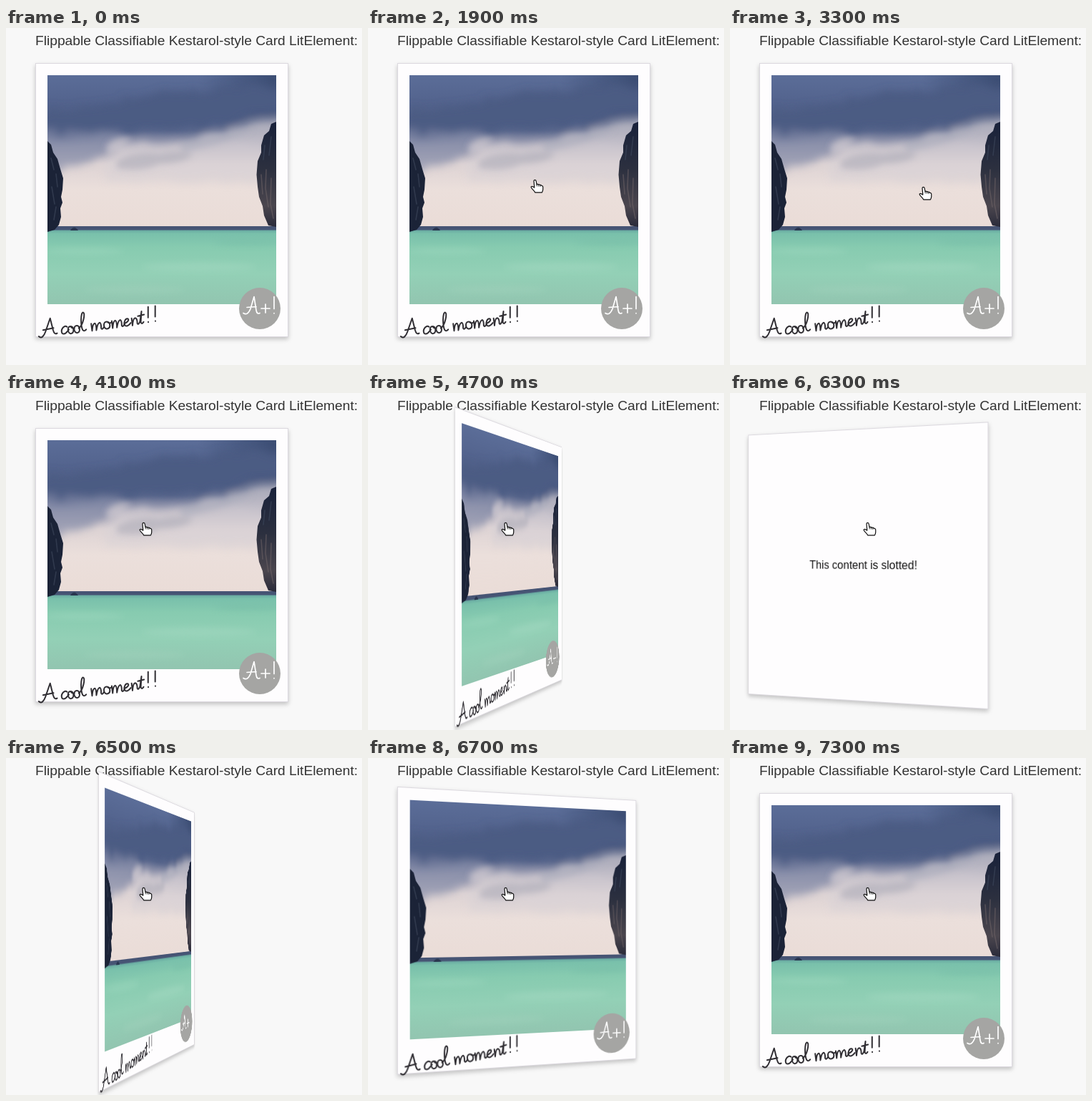
These frames come from a looping animation (498 px wide and 471 px high, 8000 ms). An HTML page:

```html
<!DOCTYPE html>
<html lang="en">
<head>
<meta charset="utf-8">
<title>Flippable card</title>
<style>
html, body { margin: 0; width: 100%; height: 100%; overflow: hidden; background: #f8f8f8; }
body { position: relative; font-family: "Liberation Sans", Arial, sans-serif; }
h1 { position: absolute; left: 41px; top: 7px; margin: 0; font-size: 19.2px; line-height: 22px;
  font-weight: 400; color: #333; white-space: nowrap; }
#scene { position: absolute; left: 41px; top: 49px; width: 354px; height: 383px;
  perspective: 1000px; perspective-origin: 160px 177px; }
#card { position: absolute; inset: 0; transform-style: preserve-3d; transform-origin: 160px 191px; }
.face { position: absolute; left: 0; top: 0; box-sizing: border-box; width: 354px; height: 383px;
  border: 1px solid #dcd9df; background: #fefdfe; box-shadow: 0 3px 6px rgba(0, 0, 0, .22);
  backface-visibility: hidden; }
.back { left: -34px; transform-origin: 194px 191px; transform: rotateY(180deg);
  display: flex; align-items: center; justify-content: center; font-size: 16px; color: #111; }
.face svg { position: absolute; left: -1px; top: -1px; overflow: visible; }
#pointer { position: absolute; left: 0; top: 0; overflow: visible; }
.ink { fill: none; stroke-linecap: round; stroke-linejoin: round; }
</style>
</head>
<body>
<h1>Flippable Classifiable Kestarol-style Card LitElement:</h1>
<div id="scene">
  <div id="card">
    <div class="face">
      <svg width="354" height="383" viewBox="41 49 354 383">
        <defs>
          <linearGradient id="sky" x1="0" y1="0" x2="0" y2="1">
            <stop offset="0" stop-color="#5b6d98"/>
            <stop offset=".2" stop-color="#52628c"/>
            <stop offset=".36" stop-color="#5d6a8f"/>
            <stop offset=".46" stop-color="#a3a3b6"/>
            <stop offset=".58" stop-color="#ddd3d4"/>
            <stop offset=".75" stop-color="#ebdfdb"/>
            <stop offset="1" stop-color="#eadcd7"/>
          </linearGradient>
          <linearGradient id="sea" x1="0" y1="0" x2="0" y2="1">
            <stop offset="0" stop-color="#5f9f9d"/>
            <stop offset=".07" stop-color="#79c0ab"/>
            <stop offset=".25" stop-color="#87cbb0"/>
            <stop offset=".6" stop-color="#93d0b6"/>
            <stop offset="1" stop-color="#92c5b0"/>
          </linearGradient>
          <linearGradient id="rock" x1="0" y1="0" x2="0" y2="1">
            <stop offset="0" stop-color="#18213a"/>
            <stop offset=".45" stop-color="#2c303f"/>
            <stop offset=".8" stop-color="#4b464e"/>
            <stop offset="1" stop-color="#2a2b3a"/>
          </linearGradient>
          <radialGradient id="shade" gradientUnits="userSpaceOnUse" cx="378" cy="66" r="110">
            <stop offset="0" stop-color="#2f4064" stop-opacity=".7"/>
            <stop offset="1" stop-color="#2f4064" stop-opacity="0"/>
          </radialGradient>
          <filter id="soft" x="-30%" y="-60%" width="160%" height="220%">
            <feTurbulence type="fractalNoise" baseFrequency=".03 .05" numOctaves="3" seed="4" result="noise"/>
            <feDisplacementMap in="SourceGraphic" in2="noise" scale="22" xChannelSelector="R" yChannelSelector="G"/>
            <feGaussianBlur stdDeviation="6"/>
          </filter>
          <filter id="mist" x="-30%" y="-60%" width="160%" height="220%"><feGaussianBlur stdDeviation="4"/></filter>
          <clipPath id="frame"><path d="M58 66H378V386H58Z"/></clipPath>
        </defs>
        <g clip-path="url(#frame)">
          <path fill="url(#sky)" d="M58 66H378V280H58Z"/>
          <path fill="url(#shade)" d="M258 66H378V176H258Z"/>
          <g filter="url(#soft)">
            <path fill="#4c5b83" d="M170 98Q270 80 395 84V118Q340 118 290 138Q230 148 190 142Q130 152 40 148V122Z"/>
            <path fill="#8189a6" opacity=".65" d="M40 140Q110 142 160 152Q148 172 118 188L40 208Z"/>
            <path fill="#d9d2d6" opacity=".7" d="M140 182Q160 156 205 162Q250 164 290 146Q340 126 395 130V212H140Z"/>
          </g>
          <g filter="url(#mist)">
            <path fill="#aeacb8" opacity=".6" d="M155 186Q180 172 215 176Q245 168 262 178Q245 190 215 190Q190 202 155 196Z"/>
            <path fill="#d9d2d7" opacity=".5" d="M140 165Q152 148 176 154Q162 168 142 180Z"/>
            <path fill="#a3a5b6" opacity=".45" d="M240 162Q290 146 345 142Q320 158 250 174Z"/>
          </g>
          <path fill="url(#sea)" d="M58 280H378V386H58Z"/>
          <path fill="#465474" d="M58 277H378V282.5H58Z"/>
          <g filter="url(#mist)" opacity=".4">
            <ellipse cx="110" cy="312" rx="55" ry="4" fill="#a6dcc4"/>
            <ellipse cx="270" cy="334" rx="80" ry="6" fill="#a9dcc5"/>
            <ellipse cx="180" cy="366" rx="70" ry="5" fill="#a5d3be"/>
            <ellipse cx="340" cy="300" rx="50" ry="4" fill="#72b9a5"/>
          </g>
          <path fill="#29364f" d="M90 283Q93 278 97 279Q100 281 101 283Z"/>
          <path fill="#1b2337" d="M58 158L63 163L66 174L72 183L76 197L80 210L79 226L77 236L79 244L76 252L77 264L74 275L68 282L58 285Z"/>
          <path fill="url(#rock)" d="M378 131L371 134L368 144L361 150L357 164L357 174L352 186L350.5 205L352 222L354 236L359 249L361 262L367 276L378 278Z"/>
          <path class="ink" stroke="#74686a" stroke-width="1.6" opacity=".5" d="M357 205L359 232M364 198L363 224L367 250M371 210L370 246L374 266"/>
          <path class="ink" stroke="#3a4358" stroke-width="1.6" opacity=".7" d="M63 182L67 198M70 204L72 222M64 222L68 246M70 250L67 268M362 164L360 184M371 152L368 178"/>
        </g>
        <g class="ink" stroke="#302e33" stroke-width="2" transform="translate(46 432) rotate(-7.5)" role="img" aria-label="A cool moment!!">
          <path d="M0-1C3 3 7 0 10-6L19-24L21-7Q22 0 26-2M7-9L22-10"/>
          <path d="M41-9C37-13 31-6 33-1Q36 2 41-3L43-5"/>
          <path d="M46-9C40-10 41 1 45 1C50 1 51-8 46-9Q48-5 51-6M55-9C49-10 49 1 54 1C59 1 59-8 55-9"/>
          <path d="M57-5C64-9 69-25 66-26C62-27 60-8 62-2Q64 1 67-2"/>
          <path id="m" d="M75-9V1Q77-9 80-9Q82-8 81 1Q84-9 87-9Q89-8 88-1Q89 2 92-2"/>
          <path d="M97-9C91-10 91 1 96 1C102 1 102-8 97-9Q100-5 103-7"/>
          <use href="#m" x="29"/>
          <path d="M121-3Q129-6 127-9C123-11 119-3 122 0Q125 2 130-3"/>
          <path d="M132-9V1Q134-9 137-9Q140-8 139-1Q140 2 143-3L147-17L144-2Q145 2 148-2M141-11L150-12"/>
          <path d="M157-22L155-7M154.5-1V-.8M167-22L165-7M164.5-1V-.8"/>
        </g>
        <circle cx="355" cy="392" r="29" fill="#a5a5a3"/>
        <path class="ink" stroke="#fff" stroke-width="1.7" role="img" aria-label="A+!" transform="translate(0 -1.5)" d="M332 400Q338 404 342 394L347 377L350 396Q351 402 355 400M337 392L350 391M357 393.5H369M363 387.5V399.5M375 377V394M375 400V400.3"/>
      </svg>
    </div>
    <div class="face back">This content is slotted!</div>
  </div>
</div>
<svg id="pointer" width="20" height="22">
  <g stroke="#111" stroke-width="1.1" stroke-linejoin="round" fill="#fff">
    <g id="hand" transform="translate(-.7 -.5) scale(1.09)">
      <path d="M5 10L4.3 2.2Q4.3.8 5.7.8Q7 .8 7.2 2.2L8 6.5Q9 5.7 10 6.8Q11.2 6.2 12.2 7.4Q13.4 7 14.3 8.2Q15.6 8.2 16 9.5V13Q15.8 15 14.8 16.8H6Q4.5 14.5 2 12Q.3 10.3 1 9.3Q2.3 8.3 5 10.6Z"/>
      <path fill="none" stroke-width=".8" d="M8 6.5L8.3 9M10.2 7L10.4 9.2M12.3 7.6L12.5 9.6"/>
    </g>
    <path id="arrow" d="M1 1V15L4.3 12L6.6 17L9 16L6.8 11.2H11Z"/>
  </g>
</svg>
<script>
const LOOP = 8000, STEP = 100;
// Pointer stops: time, x, y
const STOPS = [
  [800, 411, 147], [900, 372, 136],
  [1100, 360, 200], [1200, 330, 308], [1300, 284, 270], [1400, 320, 174],
  [1600, 300, 190], [1700, 270, 205], [1800, 245, 212], [1900, 228, 212],
  [3300, 265, 222], [3400, 345, 230], [3500, 413, 231],
  [3800, 375, 222], [3900, 290, 202], [4000, 205, 185], [4100, 187, 181]
];
const CARD_EDGE = 389;
const $ = id => document.getElementById(id);
const card = $("card"), pointer = $("pointer"), hand = $("hand"), arrow = $("arrow");

// The CSS "ease" curve, solved by bisection
function ease(x) {
  if (x <= 0) return 0;
  if (x >= 1) return 1;
  let lo = 0, hi = 1, s = .5;
  for (let i = 0; i < 24; i++) {
    s = (lo + hi) / 2;
    if (.75 * s * (1 - s) + s ** 3 < x) lo = s; else hi = s;
  }
  return .3 * s * (1 - s) ** 2 + 3 * (1 - s) * s * s + s ** 3;
}

const angle = t => 180 * (ease((t - 4500) / 875) - ease((t - 6224) / 763));

function draw(time) {
  const t = Math.floor(time % LOOP / STEP) * STEP;
  const turn = angle(t);
  card.style.transform = turn ? `rotateY(${turn}deg)` : "none";

  const stop = STOPS.filter(s => s[0] <= t).pop();
  pointer.style.display = stop ? "" : "none";
  if (!stop) return;
  const [, x, y] = stop, outside = x > CARD_EDGE;
  pointer.style.transform = `translate(${x}px, ${y}px)`;
  hand.style.display = outside ? "none" : "";
  arrow.style.display = outside ? "" : "none";
}

const start = performance.now();
function tick() {
  draw(performance.now() - start);
  requestAnimationFrame(tick);
}
tick();
</script>
</body>
</html>
```
